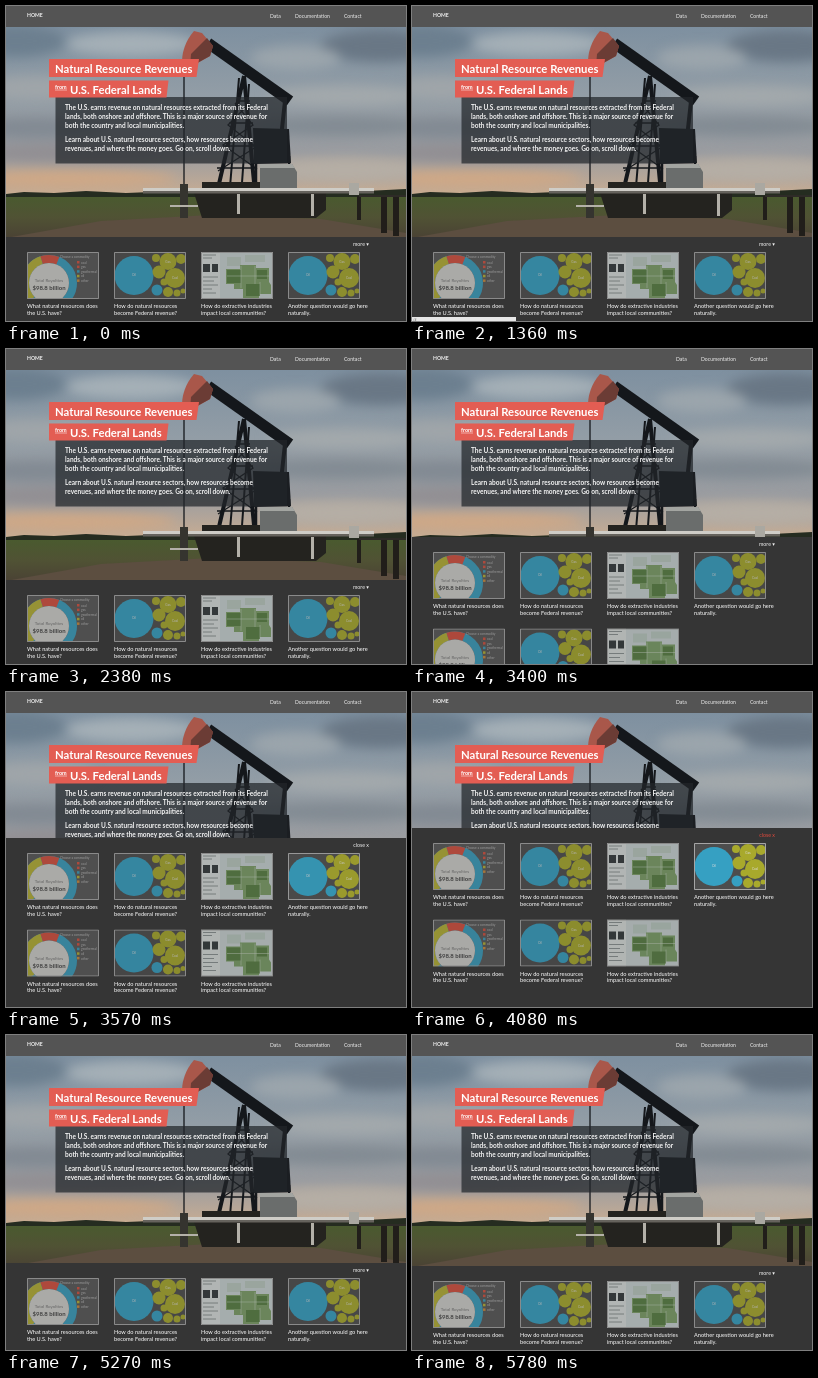
Write an HTML page that moves like this. It is 400 px wide and 315 px high and loops after 5.95 s.

```html
<!DOCTYPE html>
<html lang="en">
<head>
<meta charset="utf-8">
<style>
  html, body { margin: 0; width: 100%; height: 100%; overflow: hidden; background: #353535; }
  svg { display: block; width: 400px; height: 315px; font: 5.65px Lato, sans-serif; }
  .soft { filter: blur(6px); }
  .nav { font-size: 5.1px; fill: #eee; }
  .title { font-size: 11.3px; font-weight: 700; fill: #fff; }
  .title .from { font-size: 5.5px; }
  .intro { font-size: 6.53px; font-weight: 700; fill: #f4f4f4; }
  .tiny { font-size: 3.2px; fill: #bbb; }
</style>
</head>
<body>
<svg viewBox="0 0 400 315">
  <defs>
    <linearGradient id="sky" x1="0" y1="0" x2="0" y2="1">
      <stop offset="0" stop-color="#7e90a0"/>
      <stop offset=".4" stop-color="#929da6"/>
      <stop offset=".75" stop-color="#9a9ca0"/>
      <stop offset="1" stop-color="#c8ad93"/>
    </linearGradient>
    <linearGradient id="ground" x1="0" y1="0" x2="0" y2="1">
      <stop offset="0" stop-color="#4a5a2f"/>
      <stop offset=".5" stop-color="#505234"/>
      <stop offset="1" stop-color="#4a4234"/>
    </linearGradient>
    <clipPath id="frame"><path d="M0 0h72v47H0z"/></clipPath>
    <clipPath id="photo"><path d="M0 21h400v211H0z"/></clipPath>

    <g id="donut">
      <path d="M0 0h72v47H0z" fill="#585858"/>
      <g fill="none" stroke-width="8">
        <circle cx="22" cy="31" r="24" stroke="#3a9dbd"/>
        <circle cx="22" cy="31" r="24" stroke="#b5b035" pathLength="100" stroke-dasharray="32 68" stroke-dashoffset="-38"/>
        <circle cx="22" cy="31" r="24" stroke="#d4503f" pathLength="100" stroke-dasharray="11 89" stroke-dashoffset="-70"/>
      </g>
      <circle cx="22" cy="31" r="20" fill="#cfcfcb"/>
      <text x="22" y="30" font-size="4.5" text-anchor="middle" fill="#777">Total Royalties</text>
      <text x="22" y="38" font-size="6" font-weight="700" text-anchor="middle" fill="#444">$98.8 billion</text>
      <text x="33" y="6" class="tiny">Choose a commodity</text>
      <g id="legend"></g>
    </g>

    <g id="bubbles">
      <path d="M0 0h72v47H0z" fill="#4d4d4d"/>
      <circle cx="20" cy="23.5" r="19.5" fill="#36a0c2"/>
      <circle cx="43" cy="38" r="5.5" fill="#36a0c2"/>
      <g id="olives" fill="#a8a92c"></g>
      <g class="tiny" text-anchor="middle" style="fill:#ddd">
        <text x="20" y="24">Oil</text><text x="54" y="11">Gas</text><text x="61" y="27">Coal</text>
      </g>
    </g>

    <g id="map">
      <path d="M0 0h72v47H0z" fill="#c9d3d3"/>
      <path d="M0 0h19v47H0z" fill="#d9dedc"/>
      <path d="M2 12h7v8H2zM11 12h6v8h-6z" fill="#343a3c"/>
      <path d="M2 3h13M2 6h9M2 25h15M2 29h11M2 33h15M2 37h9M2 41h13" stroke="#8a9292"/>
      <path d="M26 5h14v9H26zM44 3h20v7H44z" fill="#bac9c0"/>
      <path d="M25 17h14v-4h16v3h13v14l2 3v9H58v4H42v-9h-9v-5h-8z" fill="#7c9f68"/>
      <path d="M26 18h14v13H26zM45 32h14v12H45zM56 18h10v9H56z" fill="#587f43"/>
      <path d="M26 24h42M40 14v22M54 14v18M59 30v14" fill="none" stroke="#cbd7c5" stroke-width=".5"/>
    </g>
  </defs>

  <g clip-path="url(#photo)">
    <path d="M0 21h400v168H0z" fill="url(#sky)"/>
    <g class="soft">
      <ellipse cx="10" cy="35" rx="50" ry="16" fill="#6c7f8f"/>
      <ellipse cx="125" cy="38" rx="65" ry="12" fill="#a5b0b7"/>
      <ellipse cx="30" cy="82" rx="60" ry="12" fill="#9fa5a9"/>
      <ellipse cx="375" cy="40" rx="60" ry="16" fill="#697785"/>
      <ellipse cx="290" cy="52" rx="45" ry="12" fill="#9ba5ac"/>
      <ellipse cx="340" cy="90" rx="80" ry="10" fill="#a3a9ac"/>
      <ellipse cx="330" cy="120" rx="95" ry="10" fill="#828b93"/>
      <ellipse cx="30" cy="122" rx="70" ry="11" fill="#828a93"/>
      <ellipse cx="70" cy="147" rx="110" ry="9" fill="#918e92"/>
      <ellipse cx="60" cy="173" rx="110" ry="9" fill="#cfa886"/>
      <ellipse cx="340" cy="164" rx="90" ry="12" fill="#b5aea5"/>
    </g>
    <path d="M0 188l18-2 30 1 32-2 40 2 50-2 60 1 60-2 50 2 60-3v12H0z" fill="#252c20"/>
    <path d="M0 191h400v41H0z" fill="url(#ground)"/>
    <path d="M0 232l95-17 110-6 110 4 85 14v5z" fill="#5c4e40"/>

    <g fill="none" stroke="#14171b">
      <path d="M178 58V184" stroke-width="1.3"/>
      <path d="M202 37L284 95" stroke-width="11"/>
      <path d="M238 70L206 208M238 70L251 208" stroke-width="4"/>
      <path d="M233 72L222 205M243 78L234 205" stroke-width="2"/>
      <path d="M230 95h14M223 117h24M217 140h33M211 162h38M229 97l18 22-30 20 34 24M244 97l-22 22 28 22-38 24" stroke-width="1.3"/>
      <path d="M279 95L273 150" stroke-width="4"/>
      <path d="M250 150V200M283 150V200" stroke-width="2.5"/>
    </g>
    <path d="M247 122l36 1 2 34-37 1z" fill="#1b1e22"/>
    <path d="M254 158h32l5 8v16h-37z" fill="#6a6d6c"/>
    <path d="M254 158h32l3 4h-35z" fill="#a3a5a1"/>
    <path d="M196 176h58v10h-58zM188 187h132v17l-10 8H196z" fill="#24231f"/>
    <path d="M188 25l8 2 11 13-3 10-23 13-5-3q-1-20 12-35z" fill="#a9574a"/>
    <path d="M185 48l16-16 6 8-3 10-20 11z" fill="#6b3c35"/>
    <path d="M137 182H368v3H137z" fill="#cfcdc7"/>
    <path d="M137 185H368v2.500H137z" fill="#66635d"/>
    <path d="M343 177h10v12h-10z" fill="#aaa8a1"/>
    <path d="M174 178h8v34h-8z" fill="#35342f"/>
    <path d="M164 199h28v2h-28zM305 188h3v22h-3zM231 188h3v20h-3z" fill="#b4b1a9"/>
    <path d="M375 190h6v37h-6zM387 190h6v40h-6zM351 190h4v24h-4z" fill="#211e1a"/>
    <path d="M353 190h47" stroke="#2e2b27" stroke-width="2"/>
  </g>

  <path d="M0 0h400v21H0z" fill="#545454"/>
  <g class="nav">
    <text x="21" y="11" font-weight="700">HOME</text>
    <text x="264" y="11.5">Data</text>
    <text x="289" y="11.5">Documentation</text>
    <text x="338" y="11.5">Contact</text>
  </g>

  <path d="M49.500 91H281v66.500H49.500z" fill="#22262a" fill-opacity=".72"/>
  <path d="M43 53h150l-2.500 18H43zM43 74.500h119.500l-2 17H43z" fill="#e35d53"/>
  <g class="title">
    <text x="49" y="66.800">Natural Resource Revenues</text>
    <text x="49" y="82.500" class="from">from</text>
    <text x="64" y="87.800">U.S. Federal Lands</text>
  </g>
  <path d="M49 84h12" stroke="#fff" stroke-width=".5"/>
  <g class="intro">
    <text x="59" y="103.800">The U.S. earns revenue on natural resources extracted from its Federal</text>
    <text x="59" y="112.800">lands, both onshore and offshore. This is a major source of revenue for</text>
    <text x="59" y="121.800">both the country and local municipalities.</text>
    <text x="59" y="135.800">Learn about U.S. natural resource sectors, how resources become</text>
    <text x="59" y="144.800">revenues, and where the money goes. Go on, scroll down.</text>
  </g>

  <g id="panel">
    <path d="M0 0h400v315H0z" fill="#353535"/>
    <text id="toggle" x="363" y="9" font-size="5.300" text-anchor="end"></text>
    <g id="cards"></g>
  </g>

  <g id="status">
    <path d="M0 311h104v4H0z" fill="#e6e6e6"/>
    <text x="1" y="315" font-size="3.500" fill="#777">/#</text>
  </g>
</svg>
<script>
const $ = id => document.getElementById(id);
const STEP = 170, LOOP = 5950;
const CLOSED = 231, OPEN = 136, SLIDE = 500;

$('legend').innerHTML = ['coal', 'gas', 'geothermal', 'oil', 'other'].map((name, i) => {
  const y = 9 + i * 4.6, color = ['#d4503f', '#d4503f', '#3a9dbd', '#b5b035', '#c98a3d'][i];
  return `<path d="M50 ${y}h2.500v2.500h-2.500z" fill="${color}"/><text x="54" y="${y + 2.6}" class="tiny">${name}</text>`;
}).join('');

$('olives').innerHTML = [
  [42, 6, 4], [54, 9.5, 8.5], [67, 7, 5], [45, 20, 6.5], [61, 26, 10],
  [50, 30, 3.5], [54, 40, 5], [63, 41, 3.5], [69, 39, 2.5]
].map(([x, y, r]) => `<circle cx="${x}" cy="${y}" r="${r}"/>`).join('');

const topics = [
  ['donut', 'What natural resources does', 'the U.S. have?'],
  ['bubbles', 'How do natural resources', 'become Federal revenue?'],
  ['map', 'How do extractive industries', 'impact local communities?'],
  ['bubbles', 'Another question would go here', 'naturally.']
];
const card = ([art, line1, line2], i, row) => `
  <g transform="translate(${21 + 87 * i} ${15 + 76.5 * row})" fill="#fff">
    <g class="thumb" opacity=".76" clip-path="url(#frame)">
      <use href="#${art}"/><path d="M.5 .5h71v46H.5z" fill="none" stroke="#a5a5a5"/>
    </g>
    <text y="56">${line1}</text><text y="62.500">${line2}</text>
  </g>`;
$('cards').innerHTML = topics.map((t, i) => card(t, i, 0)).join('')
  + topics.slice(0, 3).map((t, i) => card(t, i, 1)).join('');
const hovered = document.querySelectorAll('.thumb')[3];

const clamp = x => Math.min(1, Math.max(0, x));
const ramp = (t, from, length) => clamp((t - from) / length);

// cubic-bezier(.25, .1, .25, 1), solved by bisection
function ease(x) {
  const bezier = (a, b, s) => 3 * a * s * (1 - s) ** 2 + 3 * b * s * s * (1 - s) + s ** 3;
  let low = 0, high = 1;
  for (let i = 0; i < 24; i++) {
    const mid = (low + high) / 2;
    if (bezier(.25, .25, mid) < x) low = mid; else high = mid;
  }
  return x <= 0 ? 0 : x >= 1 ? 1 : bezier(.1, 1, low);
}

function draw(now) {
  const t = Math.floor(now % LOOP / STEP) * STEP;
  const open = ease(ramp(t, 3265, SLIDE)) - ease(ramp(t, 4878, SLIDE));
  $('panel').setAttribute('transform', `translate(0 ${Math.round(CLOSED + (OPEN - CLOSED) * open)})`);

  const closable = t >= 3570 && t < 5100;
  $('toggle').textContent = closable ? 'close x' : 'more ▾';
  $('toggle').setAttribute('fill', t >= 3910 && t < 5100 ? '#e04a3c' : '#f2f2f2');

  hovered.setAttribute('opacity', .76 + .24 * (ramp(t, 3400, 340) - ramp(t, 4080, 340)));
  $('status').setAttribute('opacity', t < 1360 ? 0 : 1 - ramp(t, 1700, 340));
  requestAnimationFrame(() => draw(performance.now()));
}
draw(0);
</script>
</body>
</html>
```
